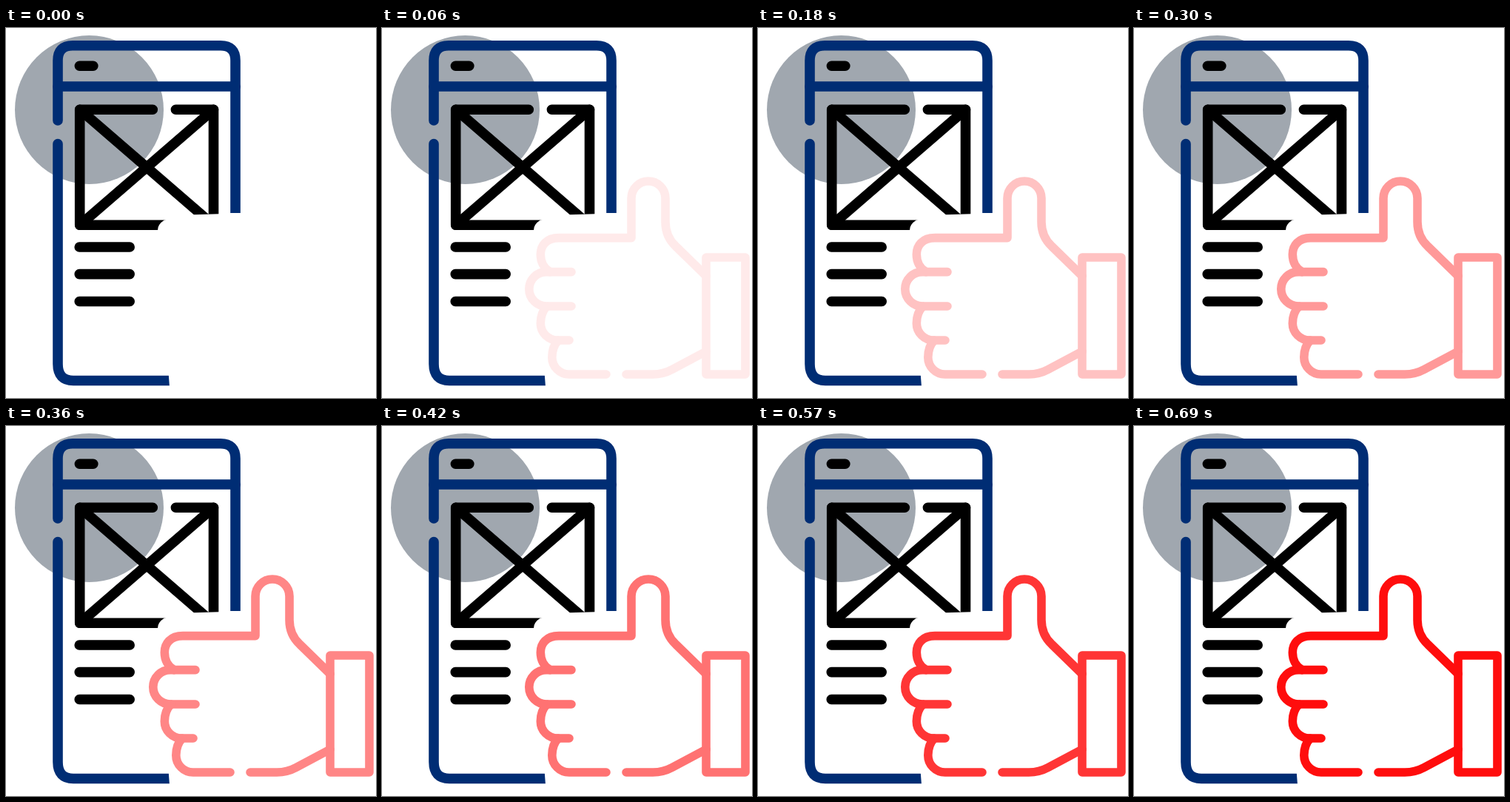
Write an HTML page that moves like this. It is 500 by 500 pixels and loops after 4920 ms.

```html
<!DOCTYPE html>
<html lang="en">
<head>
<meta charset="utf-8">
<title>Thumbs up on a wireframe</title>
<style>
  html, body { margin: 0; width: 100%; height: 100%; overflow: hidden; background: #fff; }
  svg { display: block; width: 100%; height: 100%; }
  g { fill: none; stroke-linecap: round; stroke-linejoin: round; }
  #phone { stroke: #002d74; stroke-width: 13.6; }
  #layout { stroke: #000; stroke-width: 13.6; }
  #hand { stroke: #ff0d0d; stroke-width: 11.6; opacity: 0; }
</style>
</head>
<body>
<svg viewBox="0 0 500 500">
  <circle cx="112.5" cy="110.5" r="100.5" fill="#a0a7af"/>

  <g id="phone">
    <path d="M70 125V44Q70 23.8 90 23.8H290Q310 23.8 310 44V256"/>
    <path d="M70 79H310"/>
    <path d="M70 156.5V454Q70 476.5 91 476.5H230"/>
  </g>

  <g id="layout">
    <path d="M99.4 51.3H117.8"/>
    <path d="M198.3 110.2H99.7V266.3H220"/>
    <path d="M229.4 110.2H280.5V256"/>
    <path d="M99.7 110.2L280.5 266.3M280.5 110.2L99.7 266.3"/>
    <path d="M99.2 296H167.2M99.2 332.6H167.2M99.2 369.5H167.2"/>
  </g>

  <!-- clear space behind the hand -->
  <path fill="#fff" d="M340 250H303L288 251.3L254 252.3L214 259.6Q205 265.5 205 273V290L219.8 469L221.4 490H340Z"/>

  <g id="hand">
    <path d="M438 335L397 295Q383 282 383 262V230A23 23 0 0 0 337 230V283.6H239C222 283.6 214.3 294 214.3 306C214.3 316 219 325 227 329.6"/>
    <path d="M256 329.6H222A23.2 23.2 0 0 0 222 376H256"/>
    <path d="M223 376C217 382 214.3 390 214.3 399A23 23 0 0 0 237.3 422H253"/>
    <path d="M238 422C232.5 428 229.8 436 229.8 445A23 23 0 0 0 252.8 468H303"/>
    <path d="M330 468H366Q380 468 392 461.5L438 437"/>
    <path d="M438 310H491V468H438Z"/>
  </g>
</svg>
<script>
  const LOOP = 4920;
  const times = [0, 60, 120, 180, 240, 300, 360, 420, 480, 540, 570, 630, 690];
  const last = times.length - 1;

  // The hand fades in by equal steps, then holds until the loop restarts.
  const steps = times.map((t, i) => ({
    offset: t / LOOP,
    opacity: i / last,
    easing: 'steps(1, end)'
  }));
  steps.push({ offset: 1, opacity: 1 });

  document.getElementById('hand').animate(steps, { duration: LOOP, iterations: Infinity });
</script>
</body>
</html>
```
